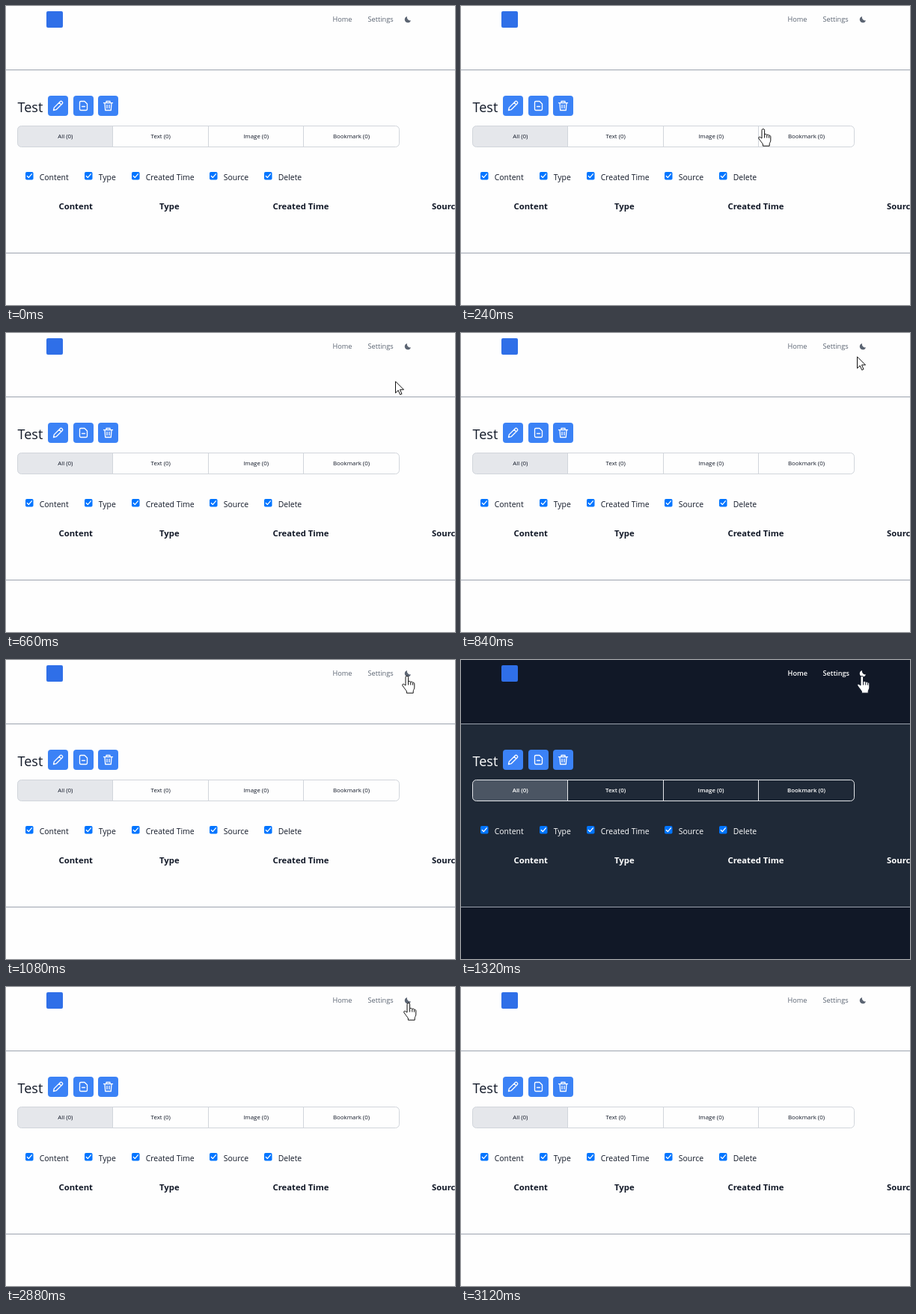
Animation, 600 px wide and 400 px high, one loop 3420 ms. Source, as an HTML page:

```html
<!DOCTYPE html>
<html lang="en">
<head>
<meta charset="utf-8">
<title>Theme toggle</title>
<style>
  html, body { margin: 0; width: 100%; height: 100%; overflow: hidden; }
  svg {
    --page: #fefefe; --panel: #fefefe; --ink: #111827; --nav: #5b6472;
    --line: #9ca3af; --border: #d1d5db; --active: #e5e7eb; --outline: #111;
    display: block; width: 100vw; height: 100vh; background: var(--page);
    font-family: "Open Sans", "Noto Sans", sans-serif;
  }
  svg.dark {
    --page: #111827; --panel: #1f2937; --ink: #fff; --nav: #fff;
    --border: #e5e7eb; --active: #4b5563; --outline: #111827;
  }
  text { fill: var(--ink); }
  .nav { font-size: 9.2px; font-weight: 500; }
  .nav text, .moon { fill: var(--nav); }
  .title { font-size: 18px; }
  .tab { font-size: 7.9px; text-anchor: middle; }
  .label { font-size: 10.45px; }
  .head { font-size: 11.3px; font-weight: 700; }
  .dark .nav, .dark .tab { font-weight: 600; }
  .panel { fill: var(--panel); }
  .rule { fill: var(--line); }
  .border { fill: none; stroke: var(--border); }
  .active { fill: var(--active); }
  .icon { fill: none; stroke: #fff; stroke-width: 1.3; stroke-linecap: round; stroke-linejoin: round; }
  .cursor { fill: #fff; stroke: var(--outline); stroke-linejoin: round; }
</style>
</head>
<body>
<svg id="stage" viewBox="0 0 600 400">
  <rect class="panel" y="85" width="600" height="246"/>
  <rect class="rule" y="85" width="600" height="1"/>
  <rect class="rule" y="330" width="600" height="1"/>

  <rect x="54" y="7" width="22" height="22" rx="2" fill="#2f6fe8"/>
  <g class="nav">
    <text x="436.5" y="21">Home</text>
    <text x="483.5" y="21">Settings</text>
  </g>
  <path class="moon" transform="translate(533 14)" d="M3 0a4.2 4.2 0 0 0 5 5.3A4.2 4.2 0 1 1 3 0z"/>

  <text class="title" x="15.5" y="142">Test</text>
  <g id="buttons"></g>

  <path class="active" d="M142 160.500H20.500a5 5 0 0 0-5 5v18a5 5 0 0 0 5 5H142z"/>
  <rect class="border" x="15.500" y="160.500" width="510" height="28" rx="5"/>
  <path class="border" d="M142.500 161v27M270.500 161v27M397.500 161v27"/>
  <g id="tabs"></g>
  <g id="checks"></g>
  <g id="heads"></g>

  <path id="arrow" class="cursor" d="M.5.8v15.400l3.700-3.500 2.500 5.800 2.300-1-2.500-5.700h5z"/>
  <path id="hand" class="cursor" d="M5 13V2.300a1.800 1.800 0 0 1 3.600 0V8c.4-1 3-.8 3.200.6.6-.8 2.600-.6 2.800.8.6-.6 2.200-.2 2.200 1.400v5c0 2-1.600 3.400-1.600 5v2.400H6.400V21C5.500 19 2.500 16 .8 13c-.6-1.600 1.200-2.600 2.500-1.200zM8.600 8v4.500M11.800 8.600v3.900M14.600 9.600v3"/>
</svg>
<script>
const $ = id => document.getElementById(id);
const fill = (id, items, markup) => { $(id).innerHTML = items.map(markup).join(""); };

const icons = [
  [56, "M2 14l.8-3.600L11 2.200a1.500 1.500 0 0 1 2.100 0l.7.7a1.500 1.500 0 0 1 0 2.100L5.600 13.200zM9.500 3.700l2.800 2.800"],
  [90, "M3 3.500a1.500 1.500 0 0 1 1.500-1.500h5L13 5.500v7a1.500 1.500 0 0 1-1.500 1.500h-7A1.500 1.500 0 0 1 3 12.500zM6 9h4"],
  [123, "M2 4.200h12M5.500 4V2h5v2M3.500 4.200l.7 9.800h7.600l.7-9.800M6.500 7v4M9.500 7v4"],
];
fill("buttons", icons, ([x, d]) =>
  `<rect x="${x}" y="120" width="27" height="27" rx="4" fill="#3b82f6"/>
   <path class="icon" transform="translate(${x + 5.5} 125.5)" d="${d}"/>`);

fill("tabs", ["All", "Text", "Image", "Bookmark"], (name, i) =>
  `<text class="tab" x="${79.3 + i * 127.4}" y="177">${name} (0)</text>`);

const checks = [[26, "Content"], [105, "Type"], [168, "Created Time"], [272, "Source"], [345, "Delete"]];
fill("checks", checks, ([x, name]) =>
  `<rect x="${x}" y="222" width="10.5" height="10.5" rx="1.8" fill="#0075ff"/>
   <path class="icon" d="M${x + 2.3} 227.500l2 2.100 4-4.800"/>
   <text class="label" x="${x + 18.7}" y="232.7">${name}</text>`);

const heads = [[70.5, "Content"], [205, "Type"], [356.5, "Created Time"], [569, "Source"]];
fill("heads", heads, ([x, name]) => `<text class="head" x="${x}" y="272">${name}</text>`);

// Each pose holds until the next: time, shape, x, y.
const poses = [
  [0, ""],
  [60, "arrow", 508, 117],
  [120, "hand", 403, 172],
  [180, "hand", 400, 168],
  [240, "hand", 397, 164],
  [300, "hand", 394, 165],
  [360, "hand", 397, 163],
  [420, "hand", 402, 164],
  [480, "arrow", 463, 120],
  [540, "arrow", 516, 81],
  [600, "arrow", 518, 75],
  [660, "arrow", 520, 64],
  [720, "arrow", 523, 52],
  [780, "arrow", 526, 41],
  [840, "arrow", 529, 31],
  [900, "arrow", 530, 27],
  [960, "hand", 528, 24],
  [1020, "hand", 528, 22],
  [1080, "hand", 529, 21],
  [2880, "hand", 531, 21],
  [2940, "hand", 536, 20],
  [3000, "arrow", 566, 14],
  [3060, "arrow", 589, 7],
  [3120, ""],
];
const LOOP = 3420;
const start = performance.now();

function draw(now) {
  const t = Math.max(0, now - start) % LOOP;
  $("stage").classList.toggle("dark", t >= 1320 && t < 2520);
  const [, shape, x, y] = poses.findLast(pose => pose[0] <= t);
  for (const id of ["arrow", "hand"]) {
    $(id).style.display = id === shape ? "" : "none";
    if (id === shape) $(id).setAttribute("transform", `translate(${x} ${y})`);
  }
  requestAnimationFrame(draw);
}
draw(start);
</script>
</body>
</html>
```
